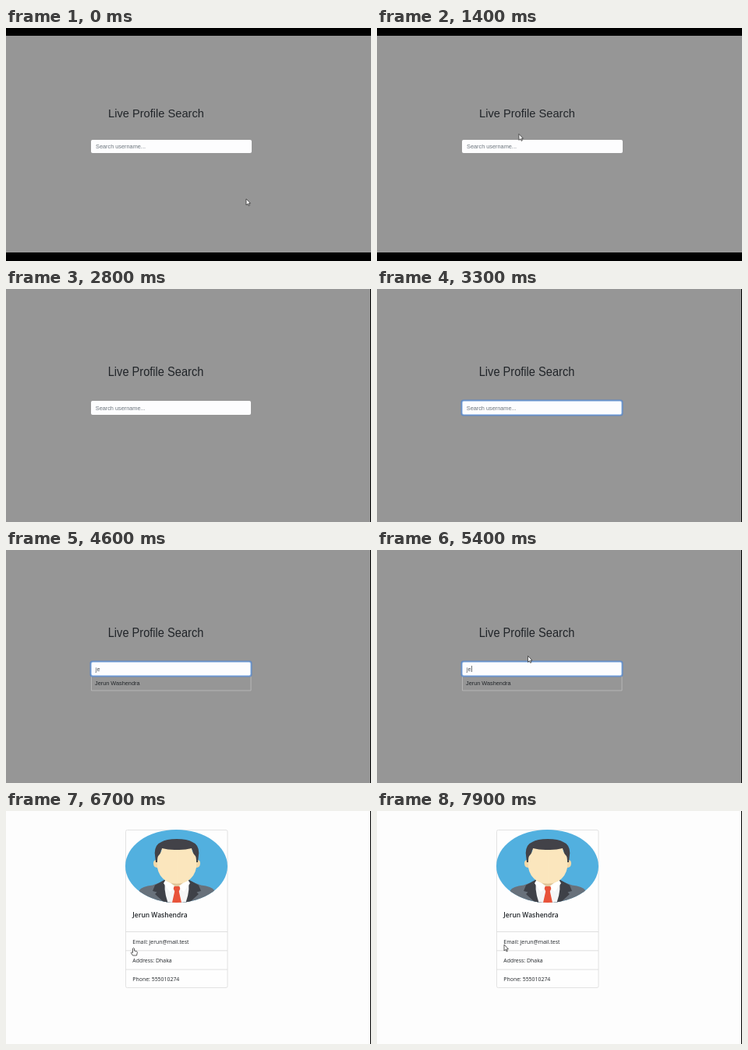
Animation of 468x300 px, one loop 8 s. Source, as an HTML page with a canvas:

```html
<!DOCTYPE html>
<html lang="en">
<head>
<meta charset="utf-8">
<title>Live Profile Search</title>
<style>
  html, body { margin: 0; width: 100%; height: 100%; overflow: hidden; background: #000; }
  canvas { display: block; }
</style>
</head>
<body>
<canvas id="stage" width="468" height="300"></canvas>
<script>
const ctx = document.getElementById('stage').getContext('2d');
const LOOP = 8000, STEP = 100;
const SANS = '"Liberation Sans", Arial, sans-serif';
const CARD_FONT = '"Open Sans", "Noto Sans", sans-serif';
const PERSON = 'Jerun Washendra';
const GREY = '#969696', INK = '#212529';

// Letterboxed view first, then the page fills the stage.
const LETTERBOX = { sx: 1, sy: 1, top: 10 };
const FULL = { sx: 467 / 468, sy: 300 / 279, top: 0 };

const ARROW = new Path2D('M0 0V8L1.9 6.3L3.2 9L4.4 8.4L3.2 5.8H5.5Z');
const HAND = new Path2D('M-1 1Q0 -.6 1 1V4L4 4.6Q5 5 4.8 6.5L4 10H-1L-3.2 6.5Q-3 5.2-1 6.4Z');

const ramp = (t, from, to) => Math.min(1, Math.max(0, (t - from) / (to - from)));
const smooth = u => u * u * (3 - 2 * u);

function text(view, str, x, y, font, color) {
  ctx.save();
  ctx.translate(x, y);
  ctx.scale(view.sx, view.sy);
  ctx.font = font;
  ctx.fillStyle = color;
  ctx.fillText(str, 0, 0);
  const width = ctx.measureText(str).width * view.sx;
  ctx.restore();
  return width;
}

function box(x, y, w, h, r, fill, stroke) {
  ctx.beginPath();
  ctx.roundRect(x, y, w, h, r);
  if (fill) { ctx.fillStyle = fill; ctx.fill(); }
  if (stroke) { ctx.strokeStyle = stroke; ctx.lineWidth = 1; ctx.stroke(); }
}

function rect(x, y, w, h, color) {
  ctx.fillStyle = color;
  ctx.fillRect(x, y, w, h);
}

// Stops are [time, x, y]; movement eases between neighbours.
const route = [
  [0, 308, 220], [200, 308, 220], [300, 307.5, 220.5], [800, 307.5, 220.5],
  [1700, 138, 107], [2150, 222, 177], [2600, 178, 150], [3000, 178, 150],
  [3300, 215, 106], [5000, 215, 108], [5900, 163.5, 176], [7300, 163.5, 176],
  [7900, 163, 172]
];

function pointerAt(t) {
  let i = route.findIndex(stop => stop[0] > t);
  if (i < 0) return route[route.length - 1].slice(1);
  const a = route[i - 1], b = route[i];
  const u = smooth(ramp(t, a[0], b[0]));
  return [a[1] + (b[1] - a[1]) * u, a[2] + (b[2] - a[2]) * u];
}

function drawPointer(x, y, shape) {
  ctx.save();
  ctx.translate(x, y);
  ctx.lineWidth = 0.8;
  ctx.strokeStyle = '#333';
  ctx.fillStyle = '#fff';
  ctx.fill(shape);
  ctx.stroke(shape);
  ctx.restore();
}

function drawSearch(t) {
  const zoomed = t >= 2800;
  const view = zoomed ? FULL : LETTERBOX;
  const X = x => x * view.sx;
  const Y = y => y * view.sy + view.top;
  const [px, py] = pointerAt(t);
  const hover = t >= 5100 && py >= 163 && py <= 181;
  const onTitle = px > 130 && px < 255 && py > 98 && py < 118;
  const onInput = px > 109 && px < 315 && py > 143 && py < 163;

  rect(0, view.top, X(468), 279 * view.sy, GREY);
  text(view, 'Live Profile Search', X(131), Y(104.6), '14.65px ' + SANS, INK);

  const focus = zoomed ? ramp(t, 2900, 3200) * (1 - ramp(t, 5900, 6200)) : 0;
  const top = Math.round(Y(134)), bottom = Math.round(Y(151));
  const right = zoomed ? 314 : 315;

  if (t >= 3900) {
    if (hover) rect(109, 163, 205, 18, '#ececec');
    box(109.5, 162.5, 204.5, 18.5, 0, null, hover ? '#d2d2d2' : '#b5b5b5');
    const width = text(view, PERSON, 114, 174.4, '7.33px ' + SANS, INK);
    if (hover) rect(114, 175, width, 0.8, INK);
  }

  if (focus) box(107.5, top - 1.5, right - 106, bottom - top + 3, 3, `rgba(70,130,215,${focus * 0.6})`);
  box(109, top, right - 109, bottom - top, 2, '#fdfdfe');
  ctx.globalAlpha = focus;
  box(109, top, right - 109, bottom - top, 2, null, '#6c9cda');
  ctx.globalAlpha = 1;

  const typed = 'je'.slice(0, t < 3800 ? 0 : t < 4100 ? 1 : 2);
  const width = text(view, typed || 'Search username...', X(115), Y(145),
    '7.33px ' + SANS, typed ? '#495057' : '#6c757d');
  const caretOn = (t >= 3800 && t < 4600) || (t >= 5100 && t < 5600);
  if (typed && caretOn) rect(Math.round(115 + width), 149, 0.8, 8, '#495057');

  if (hover) drawPointer(px, py, HAND);
  else if (!onTitle && !onInput) drawPointer(px, py, ARROW);
}

// Right half of the portrait, measured from its vertical axis; the left is its mirror.
const portrait = [
  ['#68717b', 'M-.3 118V96L16 90L31 95.5Q45 97 48 102L54 118Z'],
  ['#3e4148', 'M13 87L28 95.5L31 103L25.5 104.5L28 107L16 118H8Z'],
  ['#f5f6f7', 'M-.3 118V92L14 88Q18 99 11.5 118Z'],
  ['#dfc69b', 'M-.3 99V82H13V89Q8 96 -.3 98Z'],
  ['#fff', 'M1 98L14 88L17 93L9 104Z'],
  ['#e8533a', 'M-.3 97H3.5L4.3 100L2.8 103.5L6 118H-.3Z'],
  ['#f3d9a8', 'M24 63Q30 62 30 67.5Q30 73 24 73Z'],
  ['#424248', 'M-.3 36Q14 36 20 40Q28 43 28.3 54L27 66H23L20 50H-.3Z'],
  ['#fbe6bd', 'M-.3 50Q10 50.5 19 48Q20 54 23 57Q25 58 25 65V73Q23 84 14 90Q8 93.5 -.3 93.5Z']
].map(([color, d]) => [color, new Path2D(d)]);

function drawAvatar() {
  ctx.save();
  ctx.beginPath();
  ctx.ellipse(218.5, 71, 65.5, 47, 0, 0, 2 * Math.PI);
  ctx.fillStyle = '#52b0df';
  ctx.fill();
  ctx.clip();
  ctx.translate(219, 0);
  for (const [color, path] of portrait) {
    ctx.fillStyle = color;
    for (const side of [1, -1]) {
      ctx.save();
      ctx.scale(side, 1);
      ctx.fill(path);
      ctx.restore();
    }
  }
  ctx.restore();
}

function drawCard(t) {
  rect(0, 0, 467, 300, '#fdfdfd');
  box(153.5, 24.5, 130.5, 203, 2, '#fefefe', '#e2e2e2');
  drawAvatar();
  text(FULL, PERSON, 162.3, 137.3, '600 8.5px ' + CARD_FONT, INK);
  ['Email: jerun@mail.test', 'Address: Dhaka', 'Phone: 555010274'].forEach((line, i) => {
    rect(153, 155 + i * 24.3, 131, 1, '#dfdfdf');
    text(FULL, line, 162.3, 170.6 + i * 24.1, '6.95px ' + CARD_FONT, INK);
  });
  const [px, py] = pointerAt(t);
  drawPointer(px, py, t < 7200 ? HAND : ARROW);
}

function frame(now) {
  const t = Math.floor((now % LOOP) / STEP) * STEP;
  rect(0, 0, 468, 300, '#000');
  if (t < 6700) drawSearch(t);
  else drawCard(t);
  requestAnimationFrame(() => frame(performance.now()));
}
frame(0);
</script>
</body>
</html>
```
